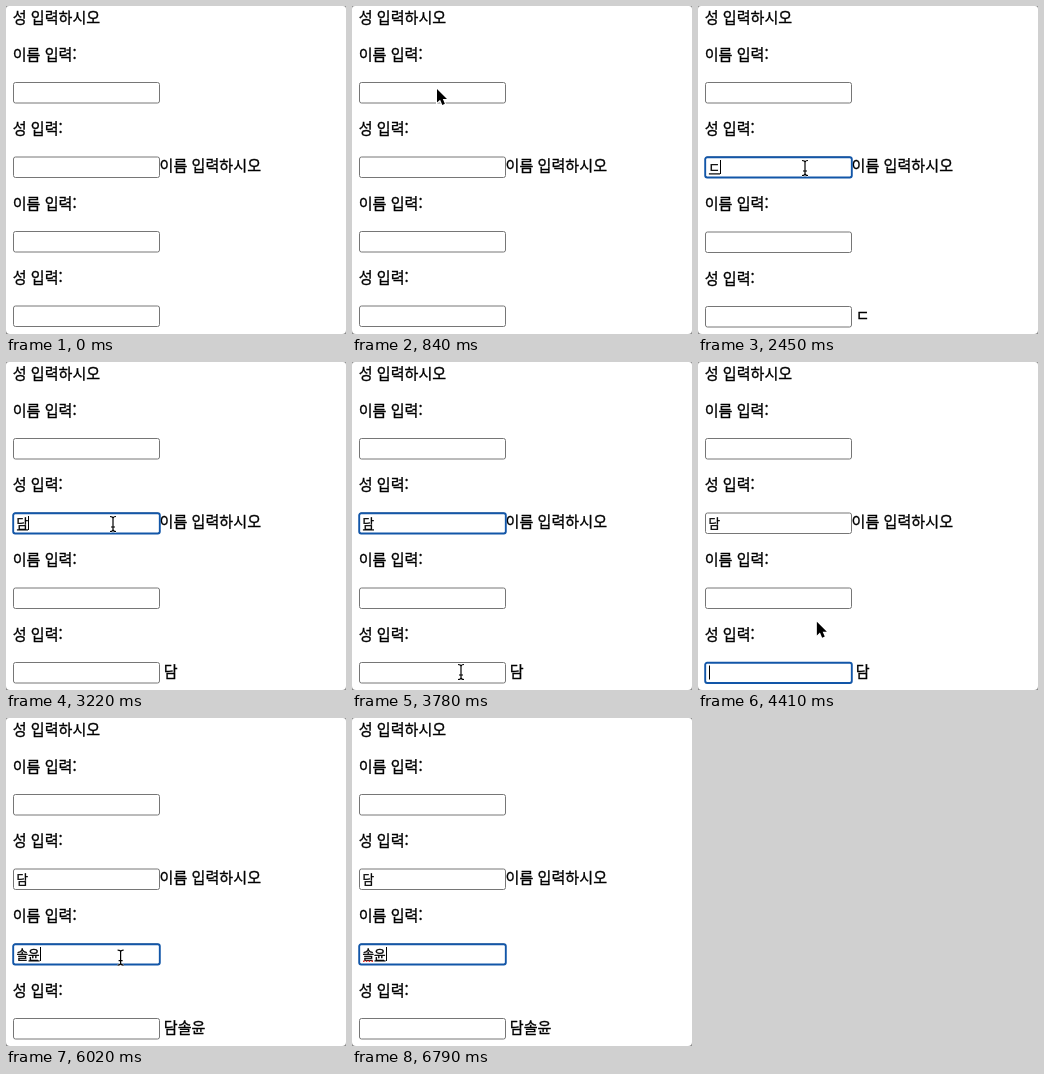
Animation of 340 by 328 pixels, one loop 6.93 s. Source, as an HTML page:

```html
<!DOCTYPE html>
<html lang="ko">
<head>
<meta charset="utf-8">
<style>
  html, body { margin: 0; height: 100%; overflow: hidden; background: #8a8a8a; }
  svg { display: block; width: 340px; height: 328px; background: #fff; border-radius: 3px 3px 4px 4px; }
  text { font: 15.1px "Noto Sans CJK KR", "Noto Sans CJK", sans-serif; stroke: #000; stroke-width: .3px; }
  .value { font-size: 12.6px; }
  .field { fill: #fff; stroke: #767676; }
  #ring { fill: none; stroke: #1256a8; stroke-width: 1.9; }
  #arrow path:first-child, #beam path:first-child { stroke: #fff; stroke-width: 2px; }
  #beam { fill: none; stroke: #000; stroke-width: 1.2px; }
</style>
</head>
<body>
<svg viewBox="0 0 340 328">
  <g id="upper"></g>
  <g id="lower"></g>
  <g id="editing">
    <rect id="ring" x="7.2" y=".3" width="146.6" height="20.2" rx="2"/>
    <rect id="underline" y="16.3" height="1.2"/>
    <rect id="caret" y="3" width="1" height="14"/>
    <path id="spelling" d="M11 17.3H22" stroke="#e0342b" stroke-width="1.6" stroke-dasharray="1.6 1.2"/>
  </g>
  <g id="arrow"></g>
  <g id="beam"></g>
</svg>
<script>
const LOOP = 6930, STEP = 70, BLINK = 500, ROW = 74.5, TEXT_X = 10.4, GLYPH = 11.6;
const $ = id => document.getElementById(id);
const rowTop = row => 76.5 + ROW * row;

const text = (x, y, s, attrs = '') => `<text x="${x}" y="${y}" ${attrs}>${s}</text>`;
const label = row => text(6.7, 53.5 + ROW * row, row % 2 ? '성 입력:' : '이름 입력:');
const field = row =>
  `<rect class="field" x="7.5" y="${rowTop(row)}" width="146" height="20.5" rx="2"/>` +
  text(TEXT_X, rowTop(row) + 14.8, '', `id="value${row}" class="value"`);
const outlined = d => `<path d="${d}"/>`.repeat(2);

$('upper').innerHTML = text(6.7, 17.2, '성 입력하시오') + label(0) + field(0) +
  label(1) + field(1) + text(153.6, 164.8, '이름 입력하시오');
$('lower').innerHTML = label(2) + field(2) + label(3) + field(3) + text(157.8, 314, '', 'id="result"');
$('arrow').innerHTML = outlined('M0 0V13.6L3.1 10.8L5.3 15.9L7.9 14.8L5.8 9.9H10Z');
$('beam').innerHTML = outlined('M-3-7.5Q0-7.5 0-5.5Q0-7.5 3-7.5M0-5.5V5.5M-3 7.5Q0 7.5 0 5.5Q0 7.5 3 7.5M-2 3H2');

// Every state a Korean input method shows while composing a word.
function compose(word) {
  const states = [''];
  [...word].forEach((syllable, i) => {
    const done = word.slice(0, i), code = syllable.charCodeAt(0) - 0xAC00, final = code % 28;
    states.push(done + 'ㄱㄲㄴㄷㄸㄹㅁㅂㅃㅅㅆㅇㅈㅉㅊㅋㅌㅍㅎ'[Math.floor(code / 588)]);
    states.push(done + String.fromCharCode(0xAC00 + code - final));
    if (final) states.push(done + syllable);
  });
  return states;
}

const typing = [
  { row: 1, start: 2450, pace: 175, states: compose('담') },
  { row: 2, start: 5180, pace: 112, states: compose('솔윤') }
];
const clicks = [{ time: 1035, row: 1 }, { time: 3920, row: 3 }, { time: 4830, row: 2 }];

// Pointer moves: start, end, x, y
const home = [182, 340];
const moves = [
  [210, 840, 85, 83], [840, 1050, 68, 55], [1120, 1540, 91, 176],
  [1680, 1960, 107, 162], [3220, 3360, 111, 290], [3430, 3640, 109, 310],
  [4130, 4480, 120, 254], [4550, 4690, 113, 236], [5950, 6580, 160, 340]
];

function pointerAt(t) {
  let [x, y] = home;
  for (const [start, end, toX, toY] of moves) {
    const k = Math.min(1, Math.max(0, (t - start) / (end - start)));
    const eased = k * k * (3 - 2 * k);
    x += (toX - x) * eased;
    y += (toY - y) * eased;
  }
  return [x, y];
}

const show = (id, visible) => $(id).style.display = visible ? '' : 'none';

function draw(t) {
  const click = clicks.filter(c => c.time <= t).pop();
  const focus = click ? click.row : -1;
  const values = ['', '', '', ''];
  let lastInput = click ? click.time : 0;
  for (const { row, start, pace, states } of typing) {
    const count = Math.min(states.length - 1, Math.max(0, Math.floor((t - start) / pace) + 1));
    values[row] = states[count];
    if (count) lastInput = Math.max(lastInput, start + (count - 1) * pace);
  }
  values.forEach((value, row) => $('value' + row).textContent = value);
  $('result').textContent = values.join('');

  // The result's line is slightly taller once it holds text.
  const shift = values[1] ? 0.5 : 0;
  $('lower').setAttribute('transform', `translate(0 ${shift})`);

  show('editing', click);
  if (click) {
    const typed = values[focus].length, end = TEXT_X + typed * GLYPH;
    $('editing').setAttribute('transform', `translate(0 ${rowTop(focus) + (focus > 1 ? shift : 0)})`);
    $('caret').setAttribute('x', Math.round(end) + (typed ? 0 : 1));
    $('underline').setAttribute('x', end - GLYPH + 0.5);
    $('underline').setAttribute('width', typed ? GLYPH - 0.5 : 0);
    show('caret', Math.floor((t - lastInput) / BLINK) % 2 === 0);
    show('spelling', t >= 6790);
  }

  const [x, y] = pointerAt(t);
  const overField = x > 7 && x < 154 && values.some((_, row) => y > rowTop(row) && y < rowTop(row) + 21);
  const pointer = click && overField ? 'beam' : 'arrow';
  for (const id of ['arrow', 'beam']) {
    show(id, id === pointer);
    $(id).setAttribute('transform', `translate(${x} ${y})`);
  }
}

// The picture updates on a fixed step.
const begin = performance.now();
function frame() {
  const t = (performance.now() - begin) % LOOP;
  draw(Math.floor(t / STEP) * STEP);
  requestAnimationFrame(frame);
}
frame();
</script>
</body>
</html>
```
